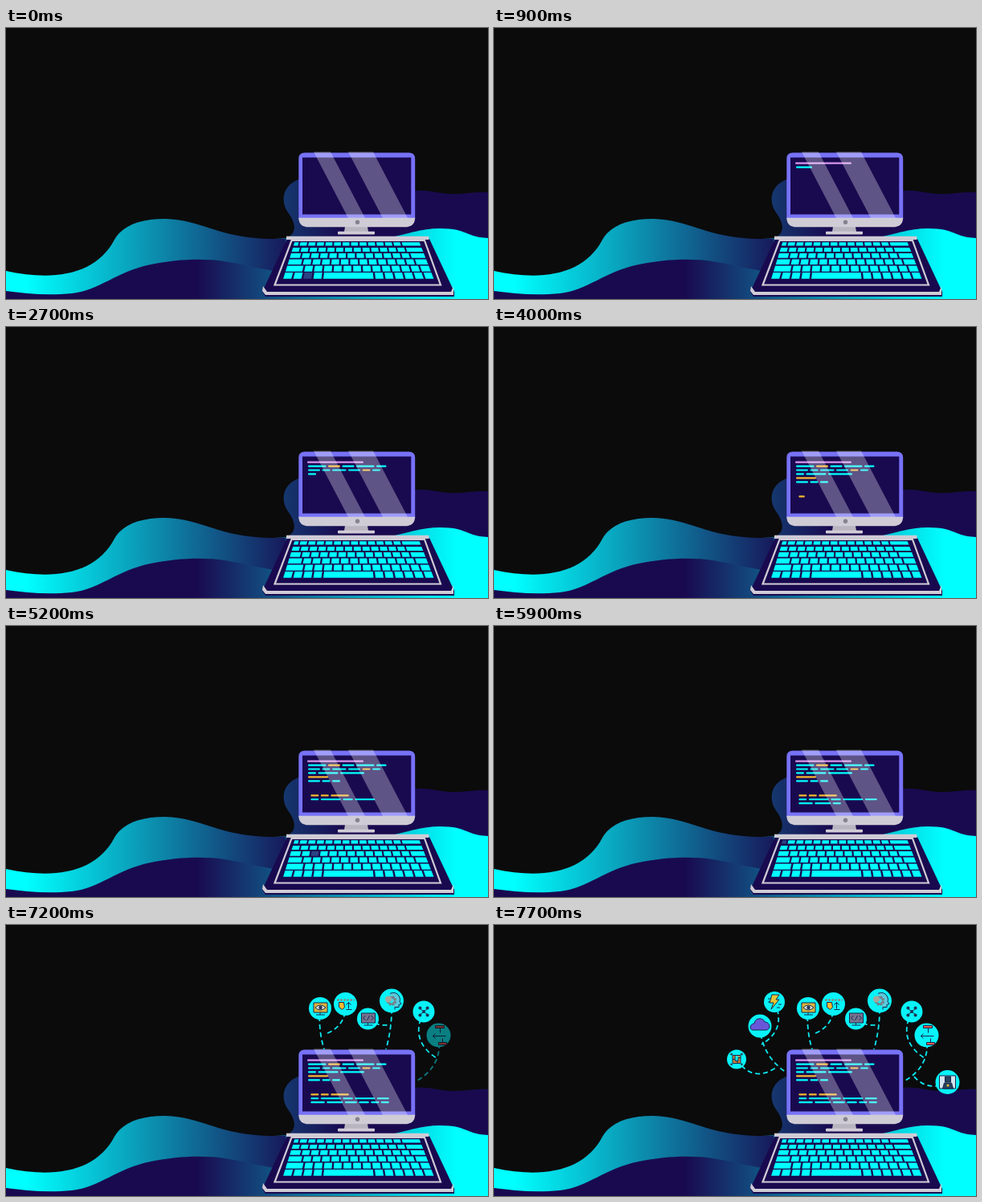
These frames come from a looping animation (600 by 338 pixels, 7.8 s). An HTML page:

```html
<!DOCTYPE html>
<html lang="en">
<head>
<meta charset="utf-8">
<title>Coding computer</title>
<style>
  html, body { margin: 0; width: 100%; height: 100%; overflow: hidden; background: #0b0b0c; }
  svg { display: block; width: 100%; height: 100%; }
  .stem { fill: none; stroke: #0ce8f0; stroke-width: 1.8; stroke-dasharray: 6 4; }
  .art { stroke: #17264f; fill: none; }
  .navy { fill: #190a50; }
  .grey { fill: #cfccd6; }
</style>
</head>
<body>
<svg viewBox="0 0 600 338">
  <defs>
    <linearGradient id="ribbon" gradientUnits="userSpaceOnUse" x1="25" x2="370">
      <stop stop-color="#00ffff"/>
      <stop offset="1" stop-color="#190a50"/>
    </linearGradient>
    <linearGradient id="floor" gradientUnits="userSpaceOnUse" x1="238" x2="560">
      <stop stop-color="#190a50"/>
      <stop offset="1" stop-color="#00ffff"/>
    </linearGradient>
    <linearGradient id="blob" gradientUnits="userSpaceOnUse" x1="345" x2="420">
      <stop stop-color="#15386f"/>
      <stop offset="1" stop-color="#190a50"/>
    </linearGradient>
  </defs>

  <!-- Waves -->
  <path fill="url(#blob)" d="M345 338V263C365 258 360 242 351 230C340 214 346 193 368 188L509 203C530 201 540 208 562 207C580 206 590 204 600 205V338Z"/>
  <path fill="url(#floor)" d="M0 320C100 330 200 270 350 262L455 264C490 262 510 250 540 250C575 250 572 261 600 262V338H0Z"/>
  <path fill="url(#ribbon)" d="M0 303C60 316 112 308 135 264C145 246 168 238 198 238C252 240 262 265 348 263V305C320 302 299 295 272 291C245 287 214 288 180 295C137 304 117 327 82 331C51 334 24 331 0 328Z"/>

  <!-- Keyboard -->
  <path class="navy" d="M350 263H527L558 329V335H323L319 329Z"/>
  <path class="grey" d="M320 322L325 329H554L557 322V333H323L319 328Z"/>
  <path fill="none" stroke="#cfccd6" stroke-width="2.2" d="M355.5 265H521L541 320.5H334.5Z"/>
  <path class="grey" d="M349 259.7H526.5V264H349Z"/>
  <g id="keys"></g>

  <!-- Monitor -->
  <path fill="#b8b5c0" d="M422 248H450L451 254H421Z"/>
  <rect class="grey" x="413" y="253.7" width="46" height="3.8" rx="1"/>
  <path fill="#7772f6" d="M364.3 238V163Q364.3 155.5 372 155.5H501.5Q509.2 155.5 509.2 163V238Z"/>
  <path class="grey" d="M364.3 236.7H509.2Q509 248.3 496 248.3H377Q364.5 248.3 364.3 236.7Z"/>
  <circle cx="437.5" cy="242.3" r="2.7" fill="#85828e"/>
  <rect class="navy" x="369" y="161.5" width="135.3" height="71"/>
  <g id="code"></g>
  <path fill="#fff" fill-opacity=".3" d="M383 154.5H404L447 237H426ZM426 154.5H457L500 237H469Z"/>
  <g id="icons"></g>
</svg>
<script>
const LOOP = 7800, STEP = 100;
const CYAN = '#00ffff', GOLD = '#f5b82e', PINK = '#d795ee', PRESSED = '#2b4384';
const $ = id => document.getElementById(id);

function add(parent, tag, attrs) {
  const node = document.createElementNS('http://www.w3.org/2000/svg', tag);
  for (const name in attrs) node.setAttribute(name, attrs[name]);
  return parent.appendChild(node);
}

// Keyboard: rows grow towards the viewer, side keys step inwards
const ones = n => Array(n).fill(1);
const keyX = (u, y) => {
  const left = 359 - (y - 268) * .31, right = 517 + (y - 268) * .4;
  return left + u * (right - left);
};
const keys = [...Array(6).keys()].map(row => {
  const top = 267.3 + 6.4 * row + .23 * row * row, bottom = top + 4.3 + .7 * row;
  const side = .7 + .3 * row;
  const widths = row < 5 ? [side, ...ones(12), 3 - side] : [...ones(4), 5.2, ...ones(6)];
  const total = widths.reduce((a, b) => a + b);
  let sum = 0;
  return widths.map(w => {
    const a = sum / total, b = (sum += w) / total - .013;
    const points = [[a, top], [b, top], [b, bottom], [a, bottom]]
      .map(([u, y]) => keyX(u, y) + ',' + y).join(' ');
    return add($('keys'), 'polygon', { points, fill: CYAN });
  });
});

// A key goes down every three and a half steps
function pressedKey(frame) {
  const press = Math.round(frame / 3.5);
  if (frame !== Math.floor(press * 3.5)) return null;
  return keys[(5 + press * 5) % 6][(2 + press * 4) % 10];
}

// Each word is drawn as a bar; capitals are keywords, # is a comment
const CHAR = 2.5, CHARS_PER_FRAME = 4;
const program = [
  '#sort-and-show-all-the-items',
  'container=RETURN filter selection items',
  'values from list(a, mapped SORT down',
  'open file(name, withDefaults',
  'TRANSFORM:',
  'output keys =[0]',
  'ELSE CASE UNDEFINED',
  'page draw(item, state transition redraw',
  'element join(id, offset width left top;'
];
program[1] = program[1].replace('=', ' ');
const words = [];
let charCount = 0;
program.forEach((line, i) => {
  const block = i > 5;
  const x0 = i === 0 ? 375 : block ? 379.3 : 376;
  const y = 167.5 + 4.95 * i + (block ? 13 : 0);
  for (const { 0: word, index } of line.matchAll(/\S+/g)) {
    const fill = word[0] === '#' ? PINK : /^[A-Z]+:?$/.test(word) ? GOLD : CYAN;
    const node = add($('code'), 'rect', { x: x0 + index * CHAR, y, height: 2.2, rx: 1, fill });
    words.push({ node, from: charCount + index, length: word.length });
  }
  charCount += line.length;
});

// Icon art is drawn around the centre of each disc
const path = (d, fill = 'none') => `<path d="${d}" fill="${fill}"/>`;
const dot = (x, y, r, fill) => `<circle cx="${x}" cy="${y}" r="${r}" fill="${fill}" stroke="none"/>`;
const ring = (n, radius, r, fill) => ones(n).map((_, i) => {
  const angle = (i + .5) * 2 * Math.PI / n;
  return dot(radius * Math.cos(angle), radius * Math.sin(angle), r, fill);
}).join('');
const screen = fill => path('M-8-7H9V5H-8ZM0 5V8M-5 8H6', fill);

// Centre, radius, far end of the stem, its bend, and the art
const icons = [
  [391, 104, 14, 396, 155, .1,
    screen('#d9b43c') + path('M-6-1Q0-7 7-1Q0 5-6-1Z', '#e9f2e4') + dot(.5, -1, 2.3, '#27364b')],
  [422.5, 98.5, 14.5, 400, 135, -.35,
    path('M-8-2H-2L-1 4L-4 7L-8 4Z', GOLD) + path('M4 6V-2M1 1L4-2L7 1M1 7H8') +
    '<path d="M-10-5H11" stroke="#b85949" stroke-width="2" stroke-dasharray="2"/>'],
  [450.5, 117, 13.5, 479, 124, .25,
    screen('#77738f') + path('M-3-4L-6-1L-3 2M4-4L7-1L4 2M2-4L-1 2')],
  [480, 94.5, 15, 473, 155, -.08,
    path('M-2-9C7-13 12-4 10 1L12 4L9 5V8H4V11', '#59cbdc') +
    ring(8, 4.5, 1.8, '#777d86') + `<g transform="translate(-4 -2)">${dot(0, 0, 4, '#a5a89e')}</g>`],
  [520, 108, 13.5, 536, 166, .45,
    path('M-5-4L5 4M-5 4L5-4') + ring(4, 6.5, 2, '#193455') + dot(0, 0, 2, '#193455')],
  [538.5, 137.5, 15, 510, 195, -.35,
    path('M-4-12H7V-9H-4ZM0 9H10V12H0Z', '#e25b50') + path('M2-9V-3M-7 1H9M-4-2L-7 1L-4 4M5 4V9')],
  [349, 96, 13, 333, 149, -.45,
    path('M-3-9H6L2-3H6L-4 9L-1 1H-6Z', '#e7c532') + path('M-8-4H-5M-8 0H-5M5 3H9M3 7H7')],
  [331, 126, 14.5, 364, 184, .25,
    path('M-9 5C-14 4-12-3-7-3C-6-11 4-11 6-5C13-5 14 4 8 5Z', '#6957d9')],
  [302, 167.5, 12, 351, 178, .5,
    path('M-5-5H5V5H-5ZM-2-5V2H2V-2H5M-5 0H-2M1 5V2', '#c98838') + ring(4, 9, 1.4, '#29485b')],
  [564.5, 196, 15, 522, 188, -.4,
    path('M-10-8H10V8H-10Z', '#d4e5ec') + path('M-3-7H4V0H-3ZM-6 8L-4 1H5L7 8Z', '#28435d') +
    dot(.5, 4, 1.5, GOLD)]
].map(([x, y, r, endX, endY, bend, art], i) => {
  const node = add($('icons'), 'g', {});
  const dx = endX - x, dy = endY - y;
  const midX = x + dx / 2 - bend * dy, midY = y + dy / 2 + bend * dx;
  add(node, 'path', { class: 'stem', d: `M${x} ${y}Q${midX} ${midY} ${endX} ${endY}` });
  add(node, 'circle', { cx: x, cy: y, r, fill: '#08f3f8' });
  add(node, 'g', { class: 'art', transform: `translate(${x} ${y})` }).innerHTML = art;
  return { node, start: 67 + i };
});

let lastKey = null;
function draw(time) {
  const frame = Math.floor(time % LOOP / STEP);
  const typed = frame * CHARS_PER_FRAME;

  const key = typed < charCount ? pressedKey(frame) : null;
  lastKey?.setAttribute('fill', CYAN);
  key?.setAttribute('fill', PRESSED);
  lastKey = key;

  for (const { node, from, length } of words)
    node.setAttribute('width', CHAR * Math.max(0, Math.min(length, typed - from)));

  // Two steps to appear: half, then full
  for (const { node, start } of icons)
    node.setAttribute('opacity', Math.max(0, Math.min(1, (frame - start + 1) / 2)));
}

let begin;
function tick(now) {
  begin ??= now;
  draw(now - begin);
  requestAnimationFrame(tick);
}
draw(0);
requestAnimationFrame(tick);
</script>
</body>
</html>
```
